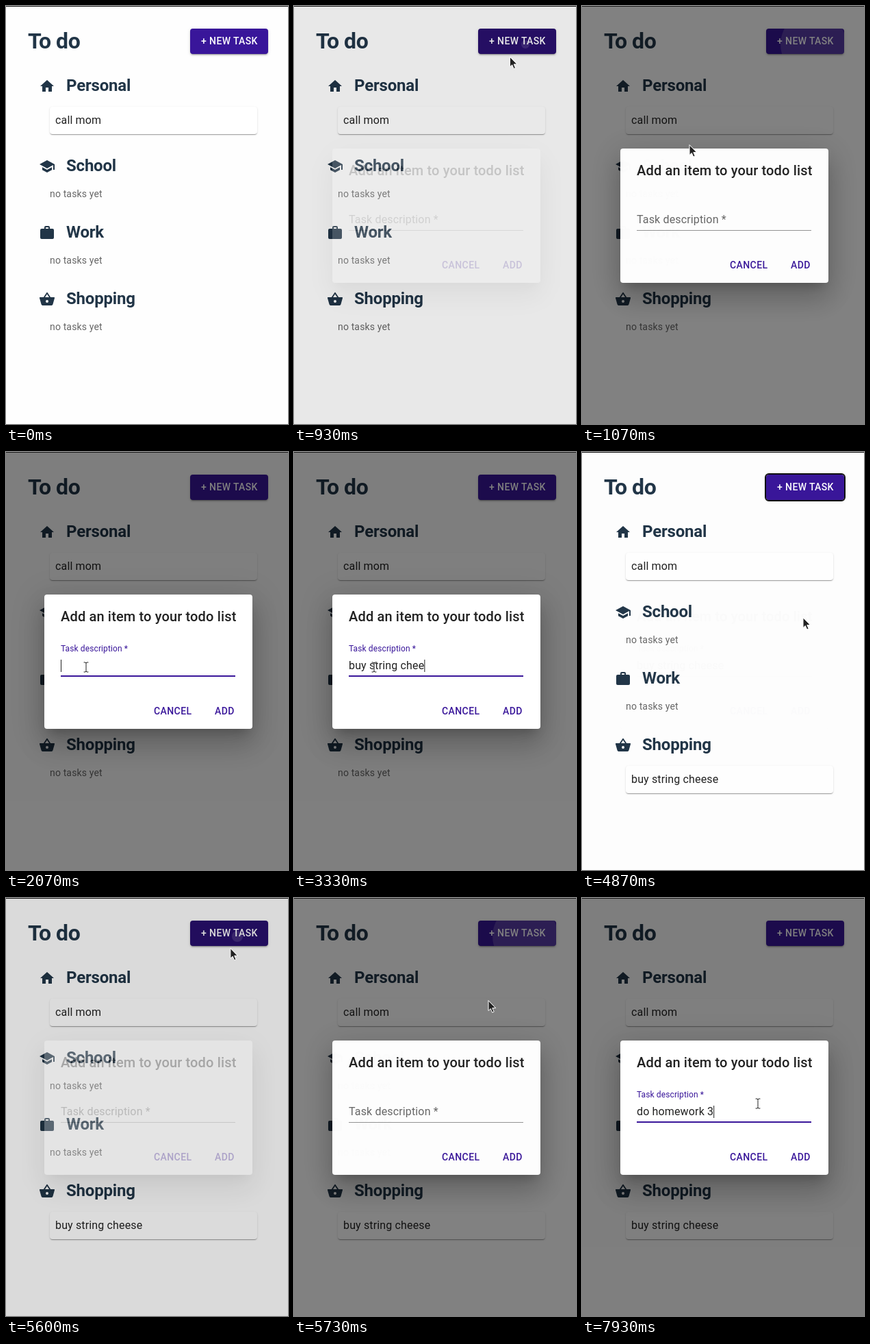
An HTML page for the animation above (8 s loop, 412 px wide and 610 px high).

```html
<!DOCTYPE html>
<html lang="en">
<head>
<meta charset="utf-8">
<title>To do</title>
<style>
  html, body { margin: 0; width: 100%; height: 100%; overflow: hidden; background: #fefefe; }
  #stage { position: relative; width: 412px; height: 610px; overflow: hidden; background: #fefefe; }
  #stage div { position: absolute; box-sizing: border-box; }
  #stage > div, svg { position: absolute; left: 0; top: 0; width: 412px; height: 610px; }
  text { font: 400 16px Roboto, sans-serif; letter-spacing: .15px; fill: #000000de; white-space: pre; }
  .h1 { font-size: 32px; font-weight: 700; letter-spacing: -.5px; fill: #213547; }
  .h2 { font-size: 24px; font-weight: 700; letter-spacing: -.2px; fill: #213547; }
  .none { font-size: 14px; fill: #0009; }
  .title { font-size: 20px; font-weight: 500; }
  .btn { font-size: 14px; font-weight: 500; letter-spacing: .4px; fill: #39169a; }
  .white { fill: #fff; }
  .icon { fill: #213547; fill-rule: evenodd; }
  .card { left: 64px; width: 303px; height: 40px; border-radius: 4px; background: #fff;
    box-shadow: 0 2px 1px -1px #0003, 0 1px 1px #00000024, 0 1px 3px #0000001f; }
  #newTask { left: 269px; top: 33px; width: 114px; height: 37px; border-radius: 4px; overflow: hidden;
    outline-offset: -.5px;
    box-shadow: 0 3px 1px -2px #0003, 0 2px 2px #00000024, 0 1px 5px #0000001f; }
  #add { left: 287.5px; top: 359.5px; width: 64px; height: 36.5px; border-radius: 4px; overflow: hidden; }
  .ripple { border-radius: 50%; }
  #stage #backdrop { background: #00000080; }
  #paper { left: 55.5px; top: 208px; width: 304px; height: 196px; border-radius: 4px; background: #fff;
    box-shadow: 0 11px 15px -7px #0003, 0 24px 38px 3px #00000024, 0 9px 46px 8px #0000001f; }
  #edge { height: 1px !important; background: #1c1c1c; }
  #pointer { overflow: visible; }
  #pointer path { stroke-linejoin: round; stroke-linecap: round; }
</style>
</head>
<body>
<div id="stage">
  <div id="page">
    <div class="card" style="top:147px"></div>
    <div class="card" id="newCard" style="top:458px"></div>
    <div id="newTask"><div class="ripple" id="newRipple" style="background:#fff"></div></div>
    <svg>
      <text class="h1" x="32" y="62">To do</text>
      <text class="btn white" x="285" y="56">+ NEW TASK</text>
      <text class="h2" x="88" y="124">Personal</text>
      <text class="h2" x="88" y="241">School</text>
      <text class="h2" x="88" y="338">Work</text>
      <text class="h2" x="88" y="435">Shopping</text>
      <g class="icon">
        <path transform="translate(48 105)" d="M10 20v-6h4v6h5v-8h3L12 3 2 12h3v8z"/>
        <path transform="translate(48 222)" d="M5 13.2v4L12 21l7-3.8v-4L12 17zM12 3 1 9l11 6 9-4.9V17h2V9z"/>
        <path transform="translate(48 319)" d="M20 6h-4V4a2 2 0 0 0-2-2h-4a2 2 0 0 0-2 2v2H4a2 2 0 0 0-2 2v11a2 2 0 0 0 2 2h16a2 2 0 0 0 2-2V8a2 2 0 0 0-2-2zM14 6h-4V4h4z"/>
        <path transform="translate(48 416)" d="M17.2 9 12.8 2.4a1 1 0 0 0-1.6 0L6.8 9H2a1 1 0 0 0-1 1.3l2.6 9.2A2 2 0 0 0 5.5 21h13a2 2 0 0 0 1.9-1.5L23 10.3A1 1 0 0 0 22 9zM9 9l3-4.4L15 9zM12 17a2 2 0 1 1 0-4 2 2 0 0 1 0 4z"/>
      </g>
      <text x="72" y="172">call mom</text>
      <text class="none" x="64" y="279">no tasks yet</text>
      <text class="none" x="64" y="376">no tasks yet</text>
      <text class="none" id="noShopping" x="64" y="473">no tasks yet</text>
      <text id="newItem" x="72" y="483">buy string cheese</text>
    </svg>
  </div>
  <div id="backdrop"></div>
  <div id="dialog">
    <div id="paper"></div>
    <div id="add"><div class="ripple" id="addRipple" style="background:#39169a"></div></div>
    <svg>
      <text class="title" x="80" y="247">Add an item to your todo list</text>
      <text id="label">Task description *</text>
      <text id="value" x="80" y="317"></text>
      <rect id="caret" y="303" width="1" height="18" fill="#222"/>
      <rect id="line" x="80" y="327" width="255" height="1"/>
      <rect id="focusLine" y="326" height="2" fill="#39169a"/>
      <text class="btn" x="216" y="383">CANCEL</text>
      <text class="btn" x="305" y="383">ADD</text>
    </svg>
  </div>
  <svg id="pointer">
    <path id="arrow" d="M0 0v14.5l3.3-3 2.4 5.6 2.5-1.1-2.4-5.4h4.5z" fill="#222" stroke="#fff"/>
    <g id="beam" fill="none">
      <path d="M-3-7h2l1 1 1-1h2M0-6V6M-3 7h2l1-1 1 1h2" stroke="#fff" stroke-width="2.4" opacity=".5"/>
      <path d="M-3-7h2l1 1 1-1h2M0-6V6M-3 7h2l1-1 1 1h2" stroke="#222"/>
    </g>
    <path id="hand" d="M-1.5 10V1a1.5 1.5 0 0 1 3 0v5l7 1.5q2 .5 1.5 3L9 17H1L-5 10q0-2 2-1.5z" fill="#fff" stroke="#222"/>
  </svg>
  <div id="edge"></div>
</div>
<script>
const LOOP = 8000;
const ui = Object.fromEntries([...document.querySelectorAll('[id]')].map(el => [el.id, el]));

const sessions = [
  { open: 880, focus: 1700, blur: 4080, close: 4700, text: 'buy string cheese', typeAt: 2510, step: 56 },
  { open: 5540, focus: 6160, blur: Infinity, close: Infinity, text: 'do homework 3', typeAt: 7020, step: 70 },
];
const ITEM_ADDED = 4690;

// Pointer stops: time, x, y
const route = [
  [70, 300, 330], [450, 330, 84], [620, 338, 56], [910, 338, 56], [1070, 157, 203],
  [1400, 119, 298], [1560, 117, 314], [3520, 117, 314], [3720, 230, 352], [3950, 319, 378],
  [4600, 319, 378], [4730, 322, 275], [4870, 323, 242], [5130, 334, 105], [5300, 338, 56],
  [5570, 338, 56], [5730, 284, 150], [5950, 258, 288], [6060, 257, 300], [LOOP, 257, 300],
];

const clamp = v => Math.min(1, Math.max(0, v));
const mix = (a, b, k) => a + (b - a) * k;

// cubic-bezier(.4, 0, .2, 1)
function ease(x) {
  x = clamp(x);
  let lo = 0, hi = 1;
  for (let i = 0; i < 20; i++) {
    const u = (lo + hi) / 2, v = 1 - u;
    if (1.2 * v * v * u + .6 * v * u * u + u ** 3 < x) lo = u; else hi = u;
  }
  return lo * lo * (3 - 2 * lo);
}
const ramp = (t, start, length) => ease((t - start) / length);
const pulse = (t, on, off, length) => ramp(t, on, length) * (1 - ramp(t, off, length));
const show = (el, on) => { el.style.visibility = on ? 'visible' : 'hidden'; };

function pointerAt(t) {
  const i = Math.max(1, route.findIndex(stop => stop[0] > t));
  const [t0, x0, y0] = route[i - 1], [t1, x1, y1] = route[i];
  const k = clamp((t - t0) / (t1 - t0));
  return [mix(x0, x1, k), mix(y0, y1, k)];
}

function ripple(el, t, down, cx, cy, radius) {
  const r = radius * ramp(t, down, 550);
  const opacity = t < down ? 0 : mix(.1, .3, ramp(t, down, 550)) * (1 - ramp(t, down + 80, 550));
  el.style.cssText += `;left:${cx - r}px;top:${cy - r}px;width:${2 * r}px;height:${2 * r}px;opacity:${opacity}`;
}

function drawPage(t) {
  const added = t >= ITEM_ADDED;
  [ui.newCard, ui.newItem].forEach(el => show(el, added));
  show(ui.noShopping, !added);
  const hover = pulse(t, 560, 930, 250) + pulse(t, 5270, 5590, 250);
  const [r, g, b] = [57, 22, 154].map(c => c * (1 - .3 * hover));
  ui.newTask.style.background = `rgb(${r},${g},${b})`;
  ui.newTask.style.outline = t >= ITEM_ADDED && t < 5500 ? '2px solid #111' : 'none';
  ripple(ui.newRipple, t, t < 5000 ? 840 : 5500, 69, 23, 74);
}

function drawDialog(t, s, x, y) {
  const opacity = ramp(t, s.open, 225) * (1 - ramp(t, s.close, 195));
  ui.backdrop.style.opacity = ui.dialog.style.opacity = opacity;

  const count = Math.min(s.text.length, Math.max(0, Math.floor((t - s.typeAt) / s.step) + 1));
  ui.value.textContent = s.text.slice(0, count);
  const focused = t >= s.focus && t < s.blur;
  const lastKey = count ? s.typeAt + (count - 1) * s.step : s.focus;
  show(ui.caret, focused && (t - lastKey) % 1000 < 500);
  ui.caret.setAttribute('x', 80 + (count ? ui.value.getComputedTextLength() : 0));

  const shrink = ramp(t, s.focus, 200);
  ui.label.setAttribute('transform', `translate(80 ${mix(317, 291, shrink)}) scale(${mix(1, .75, shrink)})`);
  ui.label.style.fill = focused ? '#39169a' : '#0009';
  const width = 255 * shrink;
  ui.focusLine.setAttribute('x', 207.5 - width / 2);
  ui.focusLine.setAttribute('width', width);
  ui.focusLine.style.opacity = 1 - ramp(t, s.blur, 200);
  const overField = x > 80 && x < 335 && y > 272 && y < 328;
  ui.line.style.fill = overField && t > s.blur ? '#000000de' : '#0000006b';

  ui.add.style.background = `rgba(57,22,154,${.04 * pulse(t, 3900, 4620, 250)})`;
  ripple(ui.addRipple, t, 4060, 32, 18, 38);
  return opacity;
}

function drawPointer(t, x, y, dialogOpacity) {
  const within = (left, top, right, bottom) => x > left && x < right && y > top && y < bottom;
  const open = dialogOpacity > .01;
  let kind = 'arrow';
  if (open ? within(288, 360, 352, 396) : within(269, 33, 383, 70)) kind = 'hand';
  else if (open && (within(80, 224, 335, 258) || within(80, 296, 335, 328))) kind = 'beam';
  for (const name of ['arrow', 'beam', 'hand']) show(ui[name], t >= 70 && name === kind);
  ui.pointer.style.transform = `translate(${x}px,${y}px)`;
}

function draw(now) {
  const t = now % LOOP;
  const [x, y] = pointerAt(t);
  drawPage(t);
  const opacity = drawDialog(t, sessions[t < 5000 ? 0 : 1], x, y);
  drawPointer(t, x, y, opacity);
}

let start;
function tick(now) {
  start ??= now;
  draw(now - start);
  requestAnimationFrame(tick);
}
draw(0);
requestAnimationFrame(tick);
</script>
</body>
</html>
```
